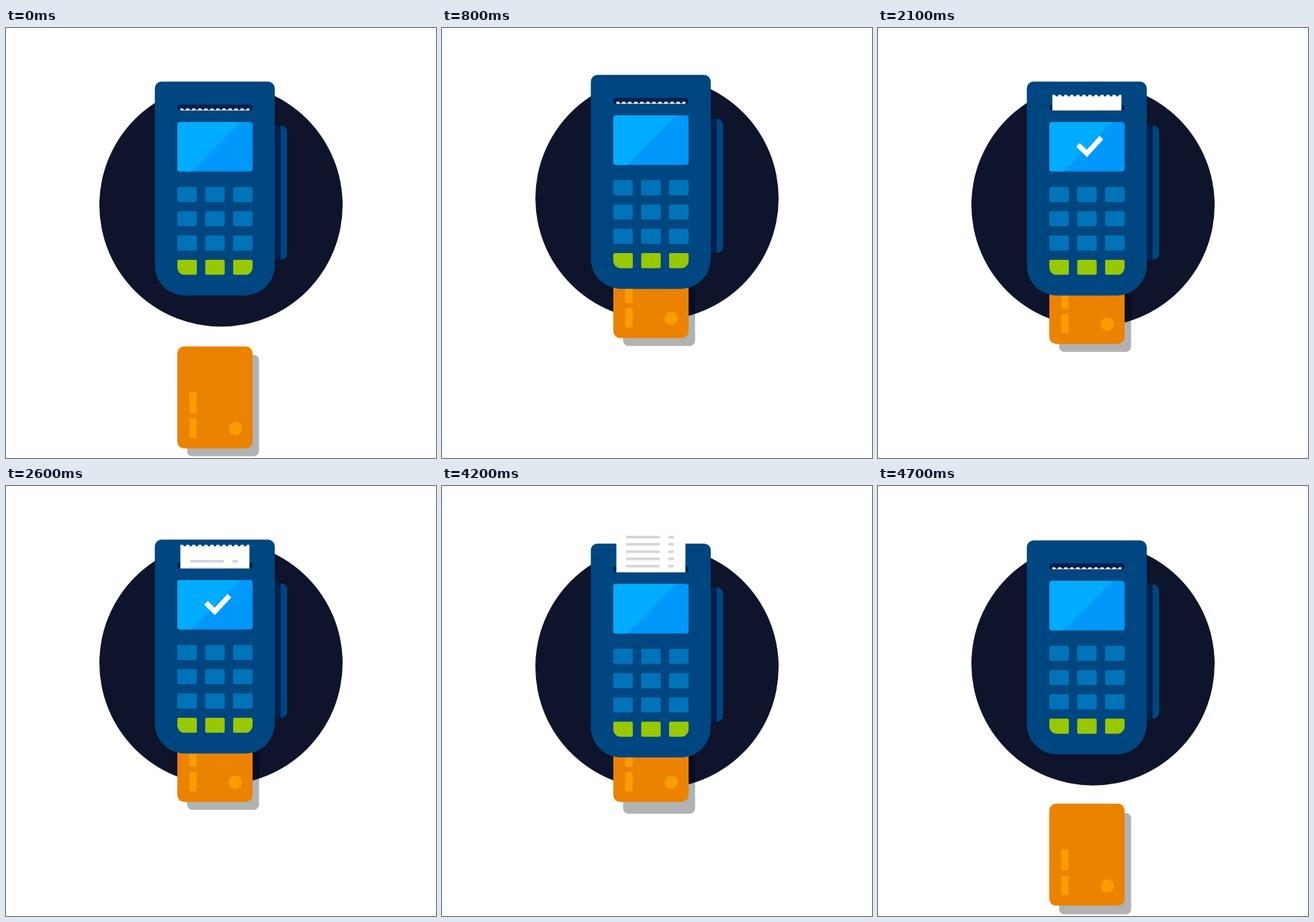
An HTML page for the animation above (4800 ms loop, 640 by 640 pixels).

```html
<!DOCTYPE html>
<html lang="en">
<head>
<meta charset="utf-8">
<title>Card payment</title>
<style>
  html, body { margin: 0; width: 100%; height: 100%; overflow: hidden; background: #fff; }
  svg { display: block; width: 100%; height: 100%; }
</style>
</head>
<body>
<svg viewBox="0 0 640 640">
  <defs>
    <clipPath id="slotClip"><rect x="250" y="0" width="122" height="122.7"/></clipPath>
  </defs>

  <circle id="disc" cx="320" cy="263.5" r="181" fill="#0d142b"/>

  <rect id="shadow" x="269.5" y="486.5" width="107.2" height="151" rx="8" opacity=".3"/>
  <g id="card" fill="#f99d00">
    <rect x="255" y="474" width="112" height="151.8" rx="10" fill="#eb8200"/>
    <rect x="272.7" y="542" width="11" height="31.5"/>
    <rect x="272.7" y="581" width="11" height="29"/>
    <circle cx="341.2" cy="596.5" r="10"/>
  </g>

  <g id="device">
    <path d="M399 145h10v200h-10z" fill="#00204f"/>
    <path d="M409 145a9.6 9.6 0 0 1 9.6 9.6v180.8a9.6 9.6 0 0 1-9.6 9.6z" fill="#004680"/>
    <path d="M231.5 79.8H390a10 10 0 0 1 10 10V353.2a45 45 0 0 1-45 45H266.5a45 45 0 0 1-45-45V89.8a10 10 0 0 1 10-10z" fill="#004680"/>
    <rect x="255" y="114" width="112" height="9" rx="4.5" fill="#00204f"/>
    <g clip-path="url(#slotClip)"><g id="paper"></g></g>
    <rect x="255" y="140" width="112" height="73.6" rx="4" fill="#0098fa"/>
    <path d="M259 140H349L276 213.6H259a4 4 0 0 1-4-4V144a4 4 0 0 1 4-4z" fill="#00acff"/>
    <path id="check" d="M297.7 173.9L310.8 186.7L332.5 163.2" fill="none" stroke="#fff" stroke-width="7.6"/>
    <g id="keys"></g>
  </g>
</svg>

<script>
const LOOP = 4800, STEP = 100;
const INSERTED = -155.5;   // card offset once it sits in the reader
const PAPER_REST = 119.8;
const $ = id => document.getElementById(id);

function buildPaper() {
  const notch = 'a2.4 2.4 0 0 0 4.8 0';
  let edge = 'M259.5 0H263.6' + notch;
  for (let i = 1; i < 11; i++) edge += 'h4.2' + notch;
  let lines = '';
  for (let i = 0; i < 8; i++) lines += `M274 ${24.6 + i * 10.85}h50m13 0h8`;
  $('paper').innerHTML =
    `<path d="${edge}H362.3V130H259.5z" fill="#fff"/>` +
    `<path d="${lines}" stroke="#d6d6d6" stroke-width="4"/>`;
}

function buildKeys() {
  const width = 29, height = 22.4;
  let keys = '';
  for (let row = 0; row < 4; row++) {
    for (let col = 0; col < 3; col++) {
      const last = row === 3;
      const left = last && col === 0 ? 11 : 2;
      const right = last && col === 2 ? 11 : 2;
      const x = 255 + col * 41.5, y = 236.5 + row * 36.15;
      keys += `<path fill="${last ? '#98c800' : '#0073b9'}" d="M${x + 2} ${y}h${width - 4}` +
        `a2 2 0 0 1 2 2v${height - 2 - right}a${right} ${right} 0 0 1 ${-right} ${right}` +
        `h${left + right - width}a${left} ${left} 0 0 1 ${-left} ${-left}` +
        `v${left + 2 - height}a2 2 0 0 1 2 -2z"/>`;
    }
  }
  $('keys').innerHTML = keys;
}

const progress = (t, start, duration) => Math.min(1, Math.max(0, (t - start) / duration));
const smooth = u => u * u * (3 - 2 * u);
const cubic = u => u < .5 ? 4 * u ** 3 : 1 - 4 * (1 - u) ** 3;

// Knocked up by the card going in, tugged down by it coming out.
function deviceOffset(t) {
  const knock = smooth(progress(t, 685, 188)) - smooth(progress(t, 900, 300));
  const tug = smooth(progress(t, 4133, 157)) - smooth(progress(t, 4290, 500));
  return 15 * (tug - knock);
}

function cardOffset(t) {
  return INSERTED * (cubic(progress(t, 150, 743)) - cubic(progress(t, 4204, 567)));
}

// Four short feeds and one long one, then the receipt slides back.
function paperTop(t) {
  let fed = 12.3 * progress(t, 1500, 100);
  for (const start of [2000, 2500, 3000]) fed += 12 * progress(t, start, 150);
  fed += 9 * progress(t, 3500, 100) + 17 * progress(t, 3600, 100);
  return PAPER_REST - fed * (1 - cubic(progress(t, 4200, 485)));
}

function move(id, y) {
  $(id).setAttribute('transform', `translate(0 ${y.toFixed(2)})`);
}

function draw(now) {
  const t = Math.floor((now % LOOP + 1) / STEP) * STEP % LOOP;
  const device = deviceOffset(t);
  const card = cardOffset(t);
  const leaving = t > 4100;
  move('disc', device);
  move('device', device);
  move('card', leaving ? card : card + device);
  move('shadow', card + device);
  move('paper', paperTop(t));
  $('check').style.display = t >= 1000 && t < 4200 ? '' : 'none';
  requestAnimationFrame(draw);
}

buildPaper();
buildKeys();
draw(performance.now());
</script>
</body>
</html>
```
